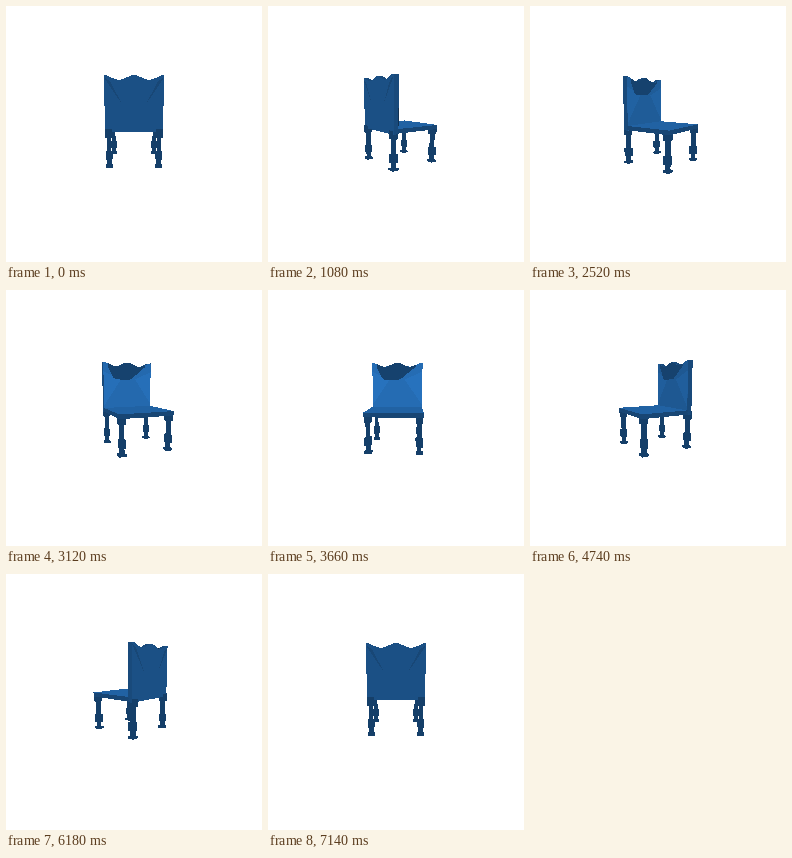
An HTML page with a canvas for the animation above (7.2 s loop, 256 px wide and 256 px high).

```html
<!DOCTYPE html>
<html lang="en">
<head>
<meta charset="utf-8">
<title>Rotating chair</title>
<style>
html, body { margin: 0; width: 100%; height: 100%; overflow: hidden; background: #fff; }
canvas { display: block; }
</style>
</head>
<body>
<canvas id="stage" width="256" height="256"></canvas>
<script>
const SIZE = 256, MID = SIZE / 2, DIST = 215, TILT = 0.168;
const STEP = 60, STEPS = 120;
const WIDTH = 26, HEIGHT = 55, FRONT = 16, BACK = 21;
const DARK = 63, SIDE = 74, PLAIN = 80, BRIGHT = 98;

const ctx = document.getElementById('stage').getContext('2d');
const image = ctx.createImageData(SIZE, SIZE);
const pixels = new Uint32Array(image.data.buffer);
const depth = new Float32Array(SIZE * SIZE);
const faces = [];

// Shine brightens a face by how far its front turns to the viewer.
function face(points, tone, shine = 0) {
  faces.push({ points, tone, shine });
}

function box(x0, x1, y0, y1, z0, z1, tone, top = tone) {
  for (const x of [x0, x1]) face([[x, y0, z0], [x, y1, z0], [x, y1, z1], [x, y0, z1]], tone);
  for (const z of [z0, z1]) face([[x0, y0, z], [x1, y0, z], [x1, y1, z], [x0, y1, z]], tone);
  for (const y of [y0, y1])
    face([[x0, y, z0], [x1, y, z0], [x1, y, z1], [x0, y, z1]], y === y1 ? top : tone);
}

function leg(x, z) {
  const block = (y0, y1, r) => box(x - r, x + r, y0, y1, z - r, z + r, DARK);
  block(-27, 8, 1.7);
  block(0.5, 8, 2.9);
  block(-20.5, -13, 2.8);
  block(-27.5, -25.7, 3.2);
}

// Three peaks: both corners and the middle.
const crest = x => HEIGHT - 4 * Math.sin(Math.PI * x / WIDTH) ** 2;

// A panel between a lower edge and the crest, cut into strips.
function panel(x0, x1, low, z, tone, shine) {
  const strips = 16, at = i => x0 + (x1 - x0) * i / strips;
  for (let i = 0; i < strips; i++) {
    const a = at(i), b = at(i + 1);
    face([[a, low(a), z], [b, low(b), z], [b, crest(b), z], [a, crest(a), z]], tone, shine);
  }
}

function backrest() {
  const base = () => 5;
  panel(-WIDTH, WIDTH, base, FRONT, 67, 41);
  panel(-WIDTH, WIDTH, base, BACK, PLAIN);
  for (let x = -WIDTH; x < WIDTH; x++)
    face([[x, crest(x), FRONT], [x + 1, crest(x + 1), FRONT], [x + 1, crest(x + 1), BACK], [x, crest(x), BACK]], SIDE);
  for (const x of [-WIDTH, WIDTH])
    face([[x, 5, FRONT], [x, HEIGHT, FRONT], [x, HEIGHT, BACK], [x, 5, BACK]], SIDE);

  // Dark carving under the crest, leaning to one side.
  const carving = x => Math.max(38, 38 + (-3 - x) * 0.8, 38 + (x - 15) * 2);
  panel(-19, 21, carving, FRONT - 0.3, 66);

  for (const x of [-WIDTH, WIDTH]) {
    face([[x, 46, FRONT - 0.1], [x * 0.3, 38, FRONT - 0.1], [x, 12, FRONT - 0.1]], 73, 41);
    face([[x, 53, BACK + 0.1], [x * 0.8, 50, BACK + 0.1], [x * 0.4, 30, BACK + 0.1]], PLAIN - 9);
  }
}

backrest();
box(-WIDTH, WIDTH, 5.5, 9.5, -31, 17, 70, BRIGHT);
for (const x of [-22.8, 22.8]) for (const z of [-27.7, 19]) leg(x, z);

function project([x, y, z], c, s) {
  const across = x * c - z * s, near = x * s + z * c;
  const up = y * Math.cos(TILT) - near * Math.sin(TILT);
  const scale = DIST / (DIST - near * Math.cos(TILT) - y * Math.sin(TILT));
  return [MID + across * scale, MID - up * scale, scale];
}

// The scale is linear on screen, so it also serves as the depth value.
function triangle(a, b, c, color) {
  const area = (b[0] - a[0]) * (c[1] - a[1]) - (b[1] - a[1]) * (c[0] - a[0]);
  if (Math.abs(area) < 1e-6) return;
  const xs = [a[0], b[0], c[0]], ys = [a[1], b[1], c[1]];
  const xEnd = Math.ceil(Math.max(...xs)), yEnd = Math.ceil(Math.max(...ys));
  for (let y = Math.floor(Math.min(...ys)); y < yEnd; y++) {
    for (let x = Math.floor(Math.min(...xs)); x < xEnd; x++) {
      const px = x + 0.5, py = y + 0.5;
      const u = ((px - a[0]) * (c[1] - a[1]) - (py - a[1]) * (c[0] - a[0])) / area;
      const v = ((b[0] - a[0]) * (py - a[1]) - (b[1] - a[1]) * (px - a[0])) / area;
      if (u < 0 || v < 0 || u + v > 1) continue;
      const d = a[2] + u * (b[2] - a[2]) + v * (c[2] - a[2]);
      const i = y * SIZE + x;
      if (d > depth[i]) {
        depth[i] = d;
        pixels[i] = color;
      }
    }
  }
}

// Packs a blue of the given green level.
function blue(g) {
  return (255 << 24 | Math.round(g * 1.66) << 16 | Math.round(g) << 8 | Math.round(g * 0.34)) >>> 0;
}

function draw(angle) {
  const c = Math.cos(angle), s = Math.sin(angle);
  pixels.fill(0xffffffff);
  depth.fill(0);
  for (const { points, tone, shine } of faces) {
    const color = blue(tone - shine * c);
    const p = points.map(q => project(q, c, s));
    for (let i = 2; i < p.length; i++) triangle(p[0], p[i - 1], p[i], color);
  }
  ctx.putImageData(image, 0, 0);
}

const start = performance.now();
function tick() {
  const step = Math.floor((performance.now() - start) / STEP) % STEPS;
  draw(2 * Math.PI * step / (STEPS - 1));
  requestAnimationFrame(tick);
}
tick();
</script>
</body>
</html>
```
